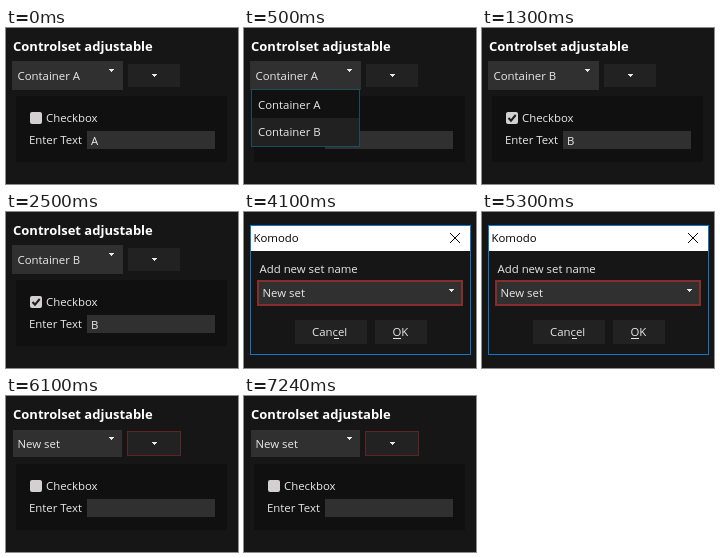
These frames come from a looping animation (232x156 px, 8 s). An HTML page with a canvas:

```html
<!DOCTYPE html>
<html lang="en">
<head>
<meta charset="utf-8">
<title>Adjustable control set</title>
<style>
  html, body { margin: 0; width: 100%; height: 100%; overflow: hidden; background: #161616; }
  canvas { display: block; width: 232px; height: 156px; }
</style>
</head>
<body>
<canvas id="stage" width="232" height="156"></canvas>
<script>
const ctx = document.getElementById('stage').getContext('2d');
const LOOP = 8000;
const PAGE = '#161616';
const INK = '#e8e8e8';
const FIELD = '#303030';
const BUTTON = '#222222';
const POPUP = '#111111';
const POPUP_EDGE = '#174e62';
const RED = '#862d2d';

function box(x, y, w, h, fill) {
  ctx.fillStyle = fill;
  ctx.fillRect(x, y, w, h);
}

function frame(x, y, w, h, color, fill, line = 1) {
  box(x, y, w, h, color);
  box(x + line, y + line, w - 2 * line, h - 2 * line, fill);
}

function text(str, x, y, color = INK, font = '11.4px') {
  ctx.font = font + ' "Open Sans", "Noto Sans", sans-serif';
  ctx.fillStyle = color;
  ctx.fillText(str, x, y);
}

function path(points, color, width) {
  ctx.beginPath();
  points.forEach(([x, y]) => ctx.lineTo(x, y));
  ctx.strokeStyle = color;
  ctx.lineWidth = width;
  ctx.stroke();
}

function caret(x, y) {
  for (let row = 0; row < 3; row++) box(x - 2 + row, y + row, 5 - 2 * row, 1, INK);
}

// A dotted ring one pixel outside the given box.
function focusRing(x, y, w, h, color) {
  ctx.setLineDash([1, 1]);
  ctx.strokeStyle = color;
  ctx.lineWidth = 1;
  ctx.strokeRect(x - 0.5, y - 0.5, w + 1, h + 1);
  ctx.setLineDash([]);
}

function checkbox(checked) {
  ctx.fillStyle = '#d2d0d0';
  ctx.beginPath();
  ctx.roundRect(24, 84, 12, 12, 2);
  ctx.fill();
  if (checked) path([[26.5, 90], [29, 92.7], [33.7, 87]], '#1c1c1c', 2);
}

function controls({ set, value, checked, menu, focus }) {
  const open = menu === 'actions';
  text('Controlset adjustable', 7, 23, '#ffffff', 'bold 13px');

  box(7, 34, 109, 27, FIELD);
  if (focus === 'set') focusRing(7, 34, 109, 27, '#484848');
  text(set, 11.5, 52);
  caret(105, 41);

  box(122, 36, 52, 23, open ? RED : BUTTON);
  if (focus === 'actions') focusRing(122, 36, 52, 23, '#a83232');
  caret(148, 46);

  box(10, 68, 211, 66, '#101010');
  checkbox(checked);
  text('Checkbox', 40, 94);
  text('Enter Text', 23, 116);
  box(81, 103, 128, 18, FIELD);
  text(value, 85, 116.5);

  if (menu === 'sets') {
    frame(7, 61, 109, 58, POPUP_EDGE, POPUP);
    box(8, 90, 107, 28, '#212121');
    text('Container A', 14, 81);
    text('Container B', 14, 108);
  }
  if (open) {
    frame(122, 60, 46, 57, POPUP_EDGE, POPUP);
    box(123, 61, 44, 27, '#212121');
    text('+', 129.5, 79);
    text('-', 129.5, 105);
  }
}

function dialog() {
  frame(6, 13, 221, 130, '#0a78d0', PAGE);
  box(7, 14, 219, 25, '#ffffff');
  text('Komodo', 9.5, 30, '#000000');
  path([[206, 21], [216, 31]], '#000000', 1);
  path([[216, 21], [206, 31]], '#000000', 1);

  text('Add new set name', 15.5, 61);
  frame(13, 68, 206, 26, RED, FIELD, 2);
  text('New set', 18.5, 85);
  caret(207, 77);

  box(51, 108, 72, 24, BUTTON);
  text('Cancel', 68, 124);
  box(90, 126, 5, 1, INK);
  box(131, 108, 52, 24, BUTTON);
  text('OK', 148.5, 124);
  box(149, 126, 8, 1, INK);
}

const setA = { set: 'Container A', value: 'A', checked: false, focus: 'set' };
const setB = { set: 'Container B', value: 'B', checked: true, focus: 'set' };
const newSet = { set: 'New set', value: '', checked: false, focus: 'actions' };

const scenes = [
  [500, () => controls(setA)],
  [1300, () => controls({ ...setA, menu: 'sets' })],
  [3300, () => controls(setB)],
  [4100, () => controls({ ...setB, menu: 'actions', focus: 'actions' })],
  [6100, dialog],
  [LOOP, () => controls(newSet)]
];

const start = performance.now();

function draw() {
  const time = (performance.now() - start) % LOOP;
  box(0, 0, 232, 156, PAGE);
  scenes.find(([end]) => time < end)[1]();
  requestAnimationFrame(draw);
}
draw();
</script>
</body>
</html>
```
